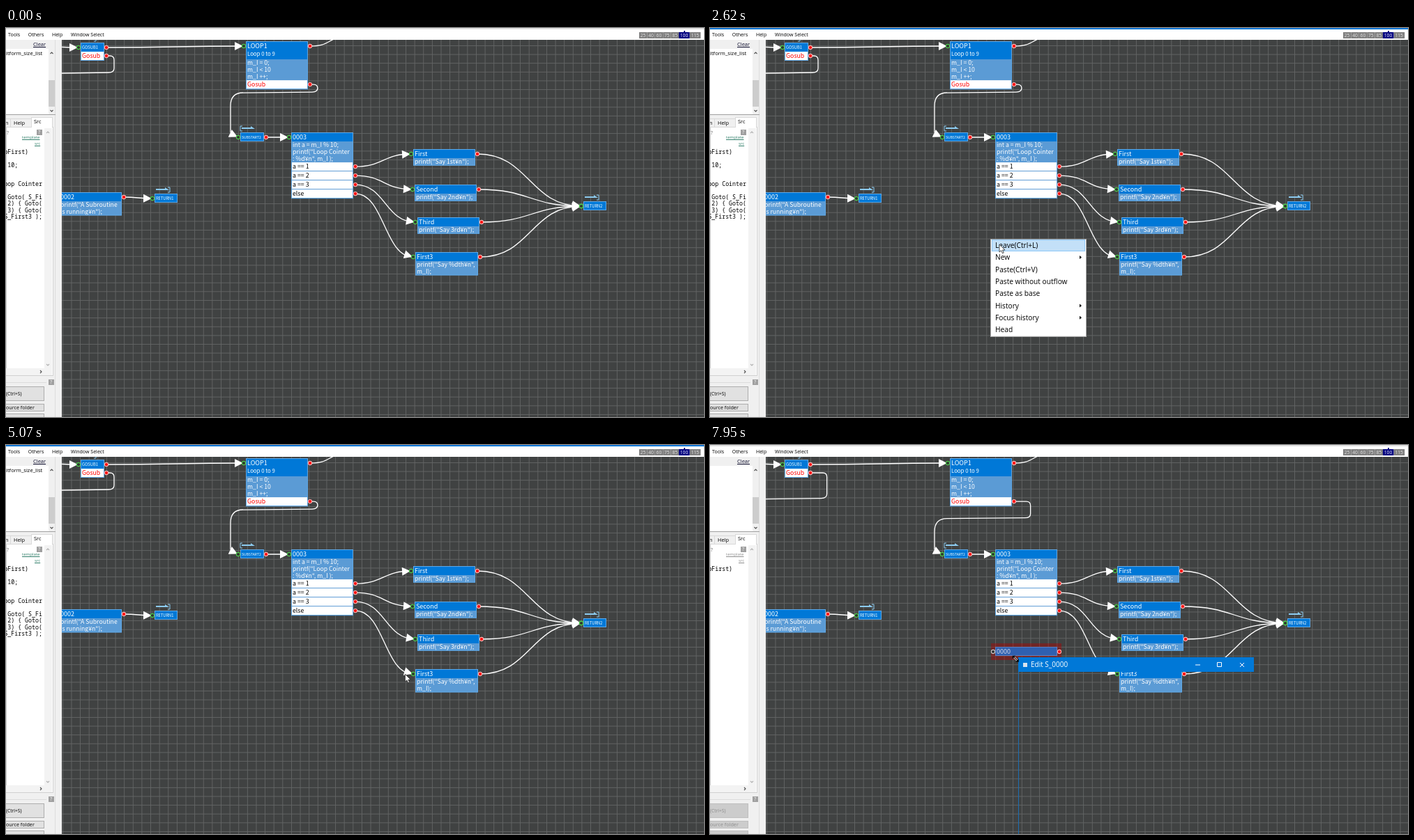
Animation, 1001 px wide and 559 px high, one loop 8000 ms. Source, as an HTML page with a canvas:

```html
<!DOCTYPE html>
<html>
<head>
<meta charset="utf-8">
<style>
html, body { margin: 0; width: 100%; height: 100%; overflow: hidden; background: #404242; }
canvas { display: block; }
</style>
</head>
<body>
<canvas id="stage" width="1001" height="559"></canvas>
<script>
const g = document.getElementById('stage').getContext('2d');
const LOOP = 8000, GRID = 12.62, ROW = 13, BLUE = '#0078d7', BODY = '#5b9bd5', EDGE = '#5fa8e6';
const UI = '"Open Sans", sans-serif';
const NODE = '"Noto Sans CJK JP", "Noto Sans CJK", "Noto Sans", sans-serif';
const MONO = '"Noto Sans Mono", monospace';

// cursor key points: time, x, y
const PATH = [
  [70, 868, 512], [270, 391, 213], [600, 396, 203], [1190, 429, 318], [1420, 435, 340],
  [1650, 412, 322], [2200, 403, 304], [2620, 415, 311], [3140, 426, 336], [3910, 558, 336],
  [4390, 561, 336], [4540, 645, 333], [4840, 645, 333], [5390, 472, 324], [5700, 472, 324],
  [5930, 469, 306], [6400, 461, 298], [6700, 461, 298], [7010, 426, 316], [7320, 435, 302],
  [8000, 438, 307]
];

function cursorAt(t) {
  const i = PATH.findIndex(p => p[0] > t);
  const [a, x, y] = PATH[i - 1], [b, u, v] = PATH[i], k = (t - a) / (b - a);
  return [x + (u - x) * k, y + (v - y) * k];
}

function rect(x, y, w, h, fill, stroke) {
  g.fillStyle = fill;
  g.fillRect(x, y, w, h);
  if (!stroke) return;
  g.strokeStyle = stroke;
  g.lineWidth = 1;
  g.strokeRect(x + .5, y + .5, w - 1, h - 1);
}

function text(s, x, y, size, color = '#fff', font = NODE) {
  g.font = size + 'px ' + font;
  g.fillStyle = color;
  g.fillText(s, x, y + size * .36);
}

function link(s, x, y, size, color) {
  text(s, x, y, size, color, UI);
  g.fillRect(x, Math.round(y + size * .5), g.measureText(s).width, 1);
}

function line(d, color = '#fff', width = 1.3) {
  g.strokeStyle = color;
  g.lineWidth = width;
  g.stroke(new Path2D(d));
}

function shape(d, color) {
  g.fillStyle = color;
  g.fill(new Path2D(d));
}

function port([x, y], fill, stroke) {
  g.beginPath();
  g.arc(x, y, 2.6, 0, 7);
  g.fillStyle = fill;
  g.fill();
  g.strokeStyle = stroke;
  g.lineWidth = 1.1;
  g.stroke();
}
const outPort = p => port(p, '#f00', '#ffb0b0');
const inPort = p => port(p, '#303630', '#4cc84c');

function arrow([x, y], angle = 0) {
  g.save();
  g.translate(x, y);
  g.rotate(angle);
  shape('M-1 0L-13 -6V6Z', '#fff');
  g.restore();
}

// port to port, handles halfway across; the arrow follows the curve's end
function wire([x, y], [u, v]) {
  const mid = (x + u) / 2;
  line(`M${x} ${y}C${mid} ${y} ${mid} ${v} ${u} ${v}`);
  arrow([u, v], Math.atan2((v - y) * .047, (u - x) * .172));
}

// state boxes; y is the height of the entry port
class State {
  constructor(x, y, w, titles, body = [], rows = [], size = 9, ink = '#000') {
    Object.assign(this, { x, w, titles, body, rows, size, ink });
    this.y = y - 7;
    this.titleH = ROW * titles.length;
    this.rowY = this.y + this.titleH + (body.length ? body.length * 9.7 + 1 : 0);
    this.h = this.rowY + rows.length * ROW - this.y;
    this.in = [x - 3, y];
  }
  out(row = -1) {
    return [this.x + this.w + 3, row < 0 ? this.in[1] : this.rowY + row * ROW + 6];
  }
  draw() {
    const { x, y, w, h, titleH, rowY } = this;
    rect(x, y, w, h, BODY);
    rect(x, y, w, titleH, BLUE);
    this.titles.forEach((s, i) => text(s, x + 2, y + 6.8 + i * 11, i ? 7.8 : this.size));
    this.body.forEach((s, i) => text(s, x + 2, y + titleH + 5.3 + i * 9.7, 8.7));
    this.rows.forEach((s, i) => {
      rect(x + 1, rowY + i * ROW, w - 2, ROW - 1, '#fff');
      text(s, x + 2, rowY + i * ROW + 6, 8.8, this.ink);
    });
    g.strokeStyle = EDGE;
    g.lineWidth = 1;
    g.strokeRect(x + .5, y + .5, w - 1, h - 1);
  }
}

const say = (x, y, name, nth) => new State(x, y, 89, [name], [`printf("Say ${nth}¥n");`]);
const gosub = new State(107, 28, 34, ['GOSUB1'], [], ['Gosub'], 5.8, '#f00');
const loop = new State(344, 26, 89, ['LOOP1', 'Loop 0 to 9'], ['m_I = 0;', 'm_I < 10', 'm_I ++;'], ['Gosub'], 9, '#f00');
const sub = new State(336, 157, 34, ['SUBSTART2'], [], [], 5.1);
const print = new State(76, 243, 90, ['0002'], ['printf("A Subroutine', 'is running¥n");']);
const ret1 = new State(213, 245, 33, ['RETURN1'], [], [], 5.7);
const ret2 = new State(828, 256, 33, ['RETURN2'], [], [], 5.7);
const pick = new State(409, 157, 89, ['0003'], ['int a = m_I % 10;', 'printf("Loop Cointer', ': %d¥n", m_I );'],
  ['a == 1', 'a == 2', 'a == 3', 'else']);
const cases = [
  say(584, 181, 'First', '1st'), say(586, 232, 'Second', '2nd'), say(590, 279, 'Third', '3rd'),
  new State(587, 329, 90, ['First3'], ['printf("Say %dth¥n",', 'm_I);'])
];
const states = [gosub, loop, sub, print, ret1, ret2, pick, ...cases];
const wires = [
  [gosub.out(), loop.in], [sub.out(), pick.in], [print.out(), ret1.in],
  ...cases.map((c, i) => [pick.out(i), c.in]),
  ...cases.map(c => [c.out(), ret2.in])
];

function icon(s) {
  const x = s.x, y = s.y - 6, c = '#8ccbf0';
  line(`M${x + 2} ${y}H${x + 17}`, c, 2);
  shape(`M${x + 15} ${y - 3}L${x + 21} ${y + 1}H${x + 15}Z`, c);
  line(s === sub ? `M${x + 3} ${y - 3}h-3v7h3` : `M${x + 19} ${y - 3}h3v7h-3`, c, 1);
}

function grid() {
  rect(80, 17, 921, 542, '#404242');
  g.fillStyle = '#646666';
  for (let x = 409 - 26 * GRID; x < 1001; x += GRID) g.fillRect(x, 17, .9, 542);
  for (let y = 290 - 21 * GRID; y < 559; y += GRID) g.fillRect(80, y, 921, .9);
}

// leaves a port to the right, drops and runs back to the left
function backWire([x, y], reach, drop, left) {
  const r = x + reach, b = y + drop;
  line(`M${x} ${y}H${r - 6}Q${r} ${y} ${r} ${y + 6}V${b - 6}Q${r} ${b} ${r - 8} ${b}L${left} ${b + 1}`);
}

function chart(t) {
  const d = t < 6730 ? 0 : GRID;
  g.save();
  g.beginPath();
  g.rect(80, 17, 921, 542);
  g.clip();
  grid();
  wire([60, 27], gosub.in);
  backWire(gosub.out(0), 11 + d, 24 + d, 80);
  backWire(loop.out(0), 11 + d, 11 + d, 340);
  line(`M340 ${93 + d}Q322 ${93 + d} 322 ${112 + d}V150`);
  arrow(sub.in, .45);
  line('M437 26C455 26 458 22 470 16');
  wires.forEach(w => wire(...w));
  [gosub, sub, ret1, ret2].forEach(icon);
  states.forEach(s => s.draw());
  wires.forEach(([a, b]) => { outPort(a); inPort(b); });
  [gosub.in, sub.in].forEach(inPort);
  [gosub.out(0), loop.out(), loop.out(0)].forEach(outPort);
  if (t >= 5390) newState(t);
  g.restore();
}

function hovered(x, y) {
  rect(x - 6, y - 5, 101, 24, 'rgba(180,0,0,.42)');
  rect(x, y, 89, ROW, '#2f60b0', '#5f80c0');
  text('0000', x + 2, y + 6.8, 9, '#d8d8e8');
}

function newState(t) {
  if (t >= 6730) {
    const s = new State(409, 297, 89, ['0000']);
    t < 7550 ? s.draw() : hovered(s.x, s.y);
    port(s.in, '#303030', '#c8c8c8');
    outPort(s.out());
    return;
  }
  hovered(420, 316);
  port([418, 322], '#503030', '#a0b840');
  port([512, 322], '#a02020', '#ff9090');
  if (t < 5700) return;
  const [cx, cy] = cursorAt(t);
  const s = new State(Math.round(cx - 52), Math.round(cy - 2), 89, ['0000']);
  rect(s.x - 5, s.y - 5, 99, 24, '#f00');
  s.draw();
  port(s.in, '#c00', '#a8e060');
  outPort(s.out());
}

function chevron(x, y, dx, dy, color = '#505050') {
  line(`M${x - 2 * dy - dx} ${y - 2 * dx - dy}L${x + dx} ${y + dy}L${x + 2 * dy - dx} ${y + 2 * dx - dy}`, color, 1.1);
}

function help(x, y) {
  rect(x, y, 8, 8, '#a0a0a0');
  text('?', x + 2.3, y + 4, 6.5, '#fff', UI);
}

function button(y, h, label, size, off) {
  rect(-2, y, 57, h, off ? '#cccccc' : '#e1e1e1', off ? '#bfbfbf' : '#adadad');
  text(label, 0, y + h / 2, size, off ? '#8c8c8c' : '#000', UI);
}

function tab(label, x, y, w, textX, fill) {
  rect(x, y, w, 143 - y, fill, '#d9d9d9');
  text(label, textX, y + 6.5, 7.4, '#000', UI);
}

function panel(t, off) {
  rect(0, 17, 80, 542, '#f0f0f0');
  rect(70, 17, 1, 542, '#dcdcdc');
  link('Clear', 39, 23.5, 7.5, '#101030');

  rect(0, 30, 70, 94, '#fff');
  rect(61, 30, 9, 94, '#f0f0f0');
  rect(61, 75, 9, 38, '#cdcdcd');
  chevron(65.5, 36, 0, -1);
  chevron(65.5, 119, 0, 1);
  rect(0, 124, 71, 1, '#a0a0a0');
  if (t < 5240) text('itform_size_list', 0, 36, 7.6, '#000', UI);

  rect(0, 142, 68, 358, '#fff', '#d0d0d0');
  tab('n', -1, 130, 8, -1, '#f0f0f0');
  tab('Help', 6, 130, 31, 11, '#f0f0f0');
  tab('Src', 36, 128, 31, 40, '#fff');
  rect(37, 141, 29, 3, '#fff');
  rect(55, 144, 11, 346, '#f3f3f3');
  rect(0, 489, 66, 10, '#f3f3f3');
  chevron(60, 150, 0, -1, '#b0b0b0');
  chevron(60, 484, 0, 1, '#b0b0b0');
  chevron(50, 494, 1, 0);
  help(44, 146);
  text('?', 1, 151, 6.5, '#555', UI);
  const ink = off ? '#909090' : '#34806c';
  link('template', 23, 157, 6.1, ink);
  link('src', 41, 166, 6.1, ink);

  const code = ['oFirst)', '', ' 10;', '', '', 'oop Cointer', '',
    ' Goto( S_Fi', ' 2) { Goto(', ' 3) { Goto(', 'S_First3 );'];
  code.slice(0, t < 5390 ? 11 : 1).forEach((s, i) => text(s, -2.6, 178 + i * 9.3, 8.25, '#000', MONO));

  help(61, 505);
  rect(0, 509, 58, 1, '#dcdcdc');
  button(515, 21, '(Ctrl+S)', 6.7, off);
  button(540, 11, 'ource folder', 7.2, off);
  button(554, 8, '', 7, off);
}

function menuBar(active) {
  rect(0, 0, 1001, 17, '#fff');
  rect(0, 0, 1001, 2, active ? BLUE : '#e0e0e0');
  let x = 3;
  for (const s of ['Tools', 'Others', 'Help', 'Window Select']) {
    text(s, x, 9.5, 7.05, '#000', UI);
    x += g.measureText(s).width + 11.7;
  }
  x = 908;
  for (const s of ['25', '40', '60', '75', '85', '100', '115']) {
    const w = s.length * 4.2 + 3, current = s === '100';
    rect(x, 6, w, 9, current ? '#000080' : '#808080');
    if (current) rect(x + 7, 4, 2, 2, '#000080');
    text(s, x + 1.8, 10.5, 6.7, current ? '#fff' : '#e0e0e0', UI);
    x += w;
  }
}

function menu(x, y, w, items, chosen, parents = []) {
  rect(x, y, w, items.length * 17.35 + 2, '#fff', '#a6a6a6');
  items.forEach((s, i) => {
    const mid = y + 9.2 + i * 17.35;
    if (i === chosen) rect(x + 2, Math.round(mid - 8), w - 4, 17, '#c3e0f8', '#90c8f6');
    text(s, x + 7, mid, 10.2, '#000', UI);
    if (parents.includes(s)) shape(`M${x + w - 10} ${mid - 2.5}l3 2.5l-3 2.5z`, '#000');
  });
}

function menus(t) {
  if (t < 2350 || t >= 4840) return;
  g.globalAlpha = t < 2450 ? .6 : 1;
  menu(402, 303, 138, ['Leave(Ctrl+L)', 'New', 'Paste(Ctrl+V)', 'Paste without outflow', 'Paste as base',
    'History', 'Focus history', 'Head'], t < 2620 ? -1 : t < 2760 ? 0 : 1, ['New', 'History', 'Focus history']);
  g.globalAlpha = 1;
  if (t >= 3140) menu(540, 322, 81, ['State', 'Embed', 'Comment'], t < 3680 ? -1 : 0, ['State']);
  if (t >= 4060) menu(621, 323, 145, ['Default', 'Loop', 'Call Subroutine', 'Subroutine Start',
    'Subroutine End(Return)', 'Pass', 'Stop'], t < 4460 ? -1 : 0);
}

function editWindow(t) {
  if (t < 7870) return;
  g.globalAlpha = t < 7950 ? .5 : 1;
  rect(442, 305, 338, 21, BLUE);
  rect(442, 326, 1, 233, '#1e6fb4');
  rect(449, 313, 6, 6, '#d8e4ee');
  text('Edit S_0000', 460, 315.8, 10, '#fff', UI);
  line('M696 316h7M727.5 312.5h6v6h-6zM760 313l6 6M766 313l-6 6', '#fff', 1);
  g.globalAlpha = 1;
}

function cursor(t) {
  if (t < 70) return;
  const [x, y] = cursorAt(t);
  g.save();
  g.translate(x, y);
  if (t >= 5700 && t < 6700) {
    g.beginPath();
    g.arc(-1, 0, 7.5, 0, 7);
    g.fillStyle = 'rgba(140,205,90,.85)';
    g.fill();
  }
  if (t >= 7870) {
    line('M-3 -3L4 4', '#fff', 2.5);
    line('M-3 -3L4 4', '#000', 1.2);
    shape('M-4 -4h4.5l-4.5 4.5zM5 5h-4.5l4.5 -4.5z', '#000');
  } else {
    const d = 'M0 0V11L2.6 8.7L4.4 12.7L6.2 11.9L4.5 8H8Z';
    shape(d, '#fff');
    line(d, '#222', .8);
  }
  g.restore();
}

const start = performance.now();
function draw() {
  const t = (performance.now() - start) % LOOP, off = t >= 7870;
  chart(t);
  panel(t, off);
  menuBar(t >= 2200 && !off);
  menus(t);
  editWindow(t);
  cursor(t);
  requestAnimationFrame(draw);
}
draw();
</script>
</body>
</html>
```
